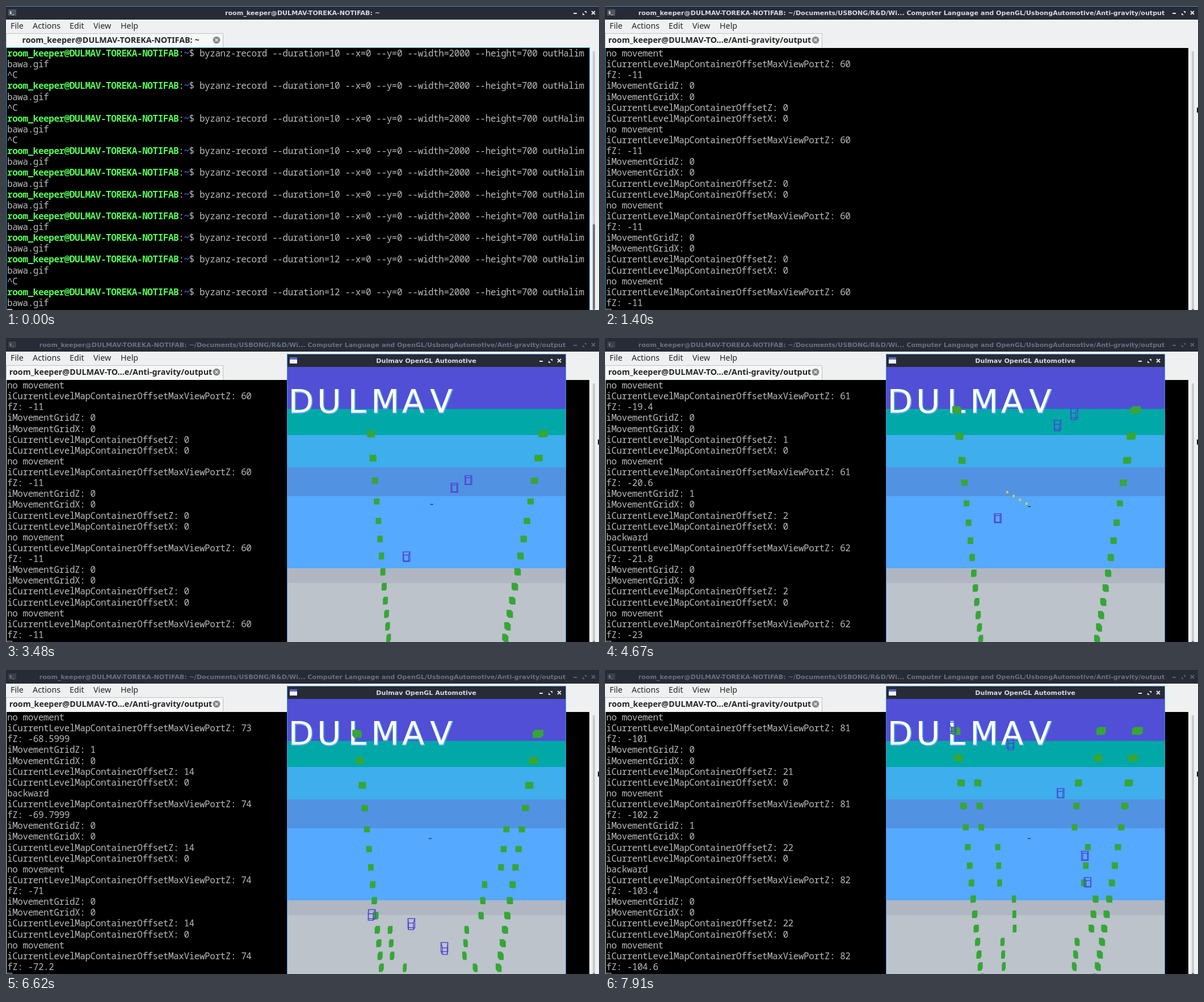
Recreate the animation shown at these times as an HTML page with a canvas. Size 1045 by 536 pixels, loop 7.99 s.

```html
<!DOCTYPE html>
<html>
<head>
<meta charset="utf-8">
<style>
html, body { margin: 0; overflow: hidden; background: #000; }
canvas { display: block; }
</style>
</head>
<body>
<canvas id="stage" width="1045" height="536"></canvas>
<script>
const ctx = document.getElementById('stage').getContext('2d');
const LOOP = 7990, STEP = 85, DRIVE_START = 4070;
const SWITCH_AT = 580, GAME_AT = 1550;

const USER = 'room_keeper@DULMAV-TOREKA-NOTIFAB';
const LONG_TITLE = USER + ': ~/Documents/USBONG/R&D/Wi... Computer Language and OpenGL/UsbongAutomotive/Anti-gravity/output';
const MONO = '16px "Noto Sans Mono", monospace';
const MENU = '14.3px "Noto Sans", sans-serif';
const TITLE = 'bold 11.1px "DejaVu Sans", sans-serif';
const GREEN = '#36a636', WIRE = '#4c48d2', BLUE = '#3daee9', BAR = '#272b36', GRAY = '#bababa';

const clamp = (v, lo, hi) => Math.max(lo, Math.min(hi, v));
const mix = (a, b, k) => a + (b - a) * k;

function rect(x, y, w, h, color) {
  ctx.fillStyle = color;
  ctx.fillRect(x, y, w, h);
}

function text(str, x, y, font, color, align = 'left') {
  ctx.font = font;
  ctx.letterSpacing = font.endsWith(MONO) ? '-0.44px' : '0px';
  ctx.fillStyle = color;
  ctx.textAlign = align;
  ctx.fillText(str, x, y);
}

function line(color, width, ...points) {
  ctx.strokeStyle = color;
  ctx.lineWidth = width;
  ctx.beginPath();
  for (let i = 0; i < points.length; i += 4) {
    ctx.moveTo(points[i], points[i + 1]);
    ctx.lineTo(points[i + 2], points[i + 3]);
  }
  ctx.stroke();
}

function polygon(points, color) {
  ctx.fillStyle = color;
  ctx.beginPath();
  points.forEach(p => ctx.lineTo(p[0], p[1]));
  ctx.closePath();
  ctx.fill();
}

// Minimise, restore and close, with the close button centred on x, y
function windowButtons(x, y, color) {
  line(color, 1.8, x - 35, y + 1, x - 29, y + 1, x - 3, y - 3, x + 3, y + 3, x - 3, y + 3, x + 3, y - 3);
  polygon([[x - 16, y - 3], [x - 12, y - 3], [x - 12, y + 1]], color);
  polygon([[x - 19, y], [x - 19, y + 4], [x - 15, y + 4]], color);
}

// Terminal

const ADVANCE = 9.16;
const rowY = i => 89 + 19.13 * i;

function drawCommands() {
  const runs = [[10, 3, true], [10, 5, false], [12, 1, true], [12, 1, false]];
  const at = column => 2 + column * ADVANCE;
  const end = USER.length;
  let row = 0;
  for (const [duration, count, stopped] of runs) {
    for (let i = 0; i < count; i++) {
      const y = rowY(row++);
      text(USER, at(0), y, 'bold ' + MONO, '#54ff54');
      text(':', at(end), y, MONO, GRAY);
      text('~', at(end + 1), y, 'bold ' + MONO, '#5c5cff');
      text(`$ byzanz-record --duration=${duration} --x=0 --y=0 --width=2000 --height=700 outHalim`,
        at(end + 2), y, MONO, GRAY);
      text('bawa.gif', 2, rowY(row++), MONO, GRAY);
      if (stopped) text('^C', 2, rowY(row++), MONO, GRAY);
    }
  }
}

const gridOffset = n => Math.max(0, Math.floor((n - 1.25) / 3.4));

function cycleLog(n) {
  const tick = Math.max(0, n), offset = gridOffset(tick);
  const moved = offset > gridOffset(tick - 1);
  const depth = 11 + 1.2 * tick;
  const drift = depth > 32 && depth < 70.5 ? 1e-4 : 0;
  const map = 'iCurrentLevelMapContainerOffset';
  return [
    'iMovementGridZ: ' + (moved ? 1 : 0),
    'iMovementGridX: 0',
    map + 'Z: ' + offset,
    map + 'X: 0',
    moved ? 'backward' : 'no movement',
    map + 'MaxViewPortZ: ' + (60 + offset),
    'fZ: -' + Number((depth - drift).toFixed(4))
  ];
}

function drawLog(n) {
  [3, 2, 1, 0].flatMap(back => cycleLog(n - back)).slice(-24)
    .forEach((str, i) => text(str, 2, rowY(i), MONO, GRAY));
}

function drawTerminal(t, tick) {
  const recording = t < SWITCH_AT, inGame = t >= GAME_AT;
  const focused = t < 90;
  const titleColor = inGame ? '#687080' : '#d3dae3';

  rect(0, 0, 1045, 536, '#eff0f1');
  rect(0, 0, 1045, 24, BAR);
  if (!inGame) rect(0, 0, 1045, 1, '#4a90d9');
  rect(4, 6, 14, 11, inGame ? '#3a3f4a' : '#50555c');
  text('$_', 6, 14, 'bold 7px "DejaVu Sans Mono", monospace', inGame ? '#8a8f98' : '#fff');
  text(recording ? USER + ': ~' : LONG_TITLE, 522.5, 15.5, TITLE, titleColor, 'center');
  windowButtons(1035, 12, inGame ? '#596070' : '#e8ebf0');

  [['File', 8], ['Actions', 47], ['Edit', 112], ['View', 154], ['Help', 202]]
    .forEach(([label, x]) => text(label, x, 40, MENU, '#232629'));

  rect(0, 48, 383, 25, '#bfc1c3');
  rect(1, 49, 381, 24, '#f6f7f7');
  text(recording ? USER + ': ~' : 'room_keeper@DULMAV-TO...e/Anti-gravity/output',
    184.5, 65, 'bold ' + MENU, '#232629', 'center');
  ctx.fillStyle = '#86888a';
  ctx.beginPath();
  ctx.arc(371, 60, 6.3, 0, 7);
  ctx.fill();
  line('#f4f4f4', 1.2, 368.5, 57.5, 373.5, 62.5, 368.5, 62.5, 373.5, 57.5);

  if (focused) rect(0, 73, 1029, 463, BLUE);
  else if (!inGame) rect(0, 74, 1, 462, BLUE);
  rect(1, 74, 1027, 462, '#000');
  if (recording) drawCommands(); else drawLog(tick);
  if (focused) rect(2, 534, 9, 2, '#b2b2b2');
  else line('#b2b2b2', 1, 2, 534.5, 11, 534.5, 2.5, 534, 2.5, 536, 10.5, 534, 10.5, 536);

  if (recording || t >= 1400) {
    rect(1034, 80, 4, 456, '#c9cbcd');
    if (recording) rect(1034, 385, 4, 151, '#6f7377');
  }
  rect(1034, 534, 4, 2, '#888b8e');

  if (!recording) {
    polygon([[1042, 176], [1042, 191], [1045, 188], [1045, 178]], '#fff');
    polygon([[1043, 178], [1043, 189], [1045, 187], [1045, 180]], '#111');
  }
}

// Game

const road = { scroll: 0, slide: 0 };
const depthY = u => 1268.8 - 27106 / (u + 23.74);

function columnX(col, y) {
  const shift = road.slide * (27.5 - 0.0252 * (y - 167));
  const left = 620 + 0.104 * (y - 127), right = 935 - 0.168 * (y - 127);
  return mix(left, right, col / 10) + shift;
}

function place(col, row) {
  const y = depthY(row - road.scroll);
  return [columnX(col, y), y];
}

// Half the offset between the near and far face of a block
const lean = (x, y) => [(x - 748) / 190 * (290 - y) / 170 * 2.3, Math.abs(290 - y) / 100];

function drawBush(col, row) {
  const [x, y] = place(col, row), [sx, sy] = lean(x, y);
  const half = 5.6 - (y - 110) * 0.008 + Math.abs(x - 748) * 0.008;
  const g = sx < 0 ? -half : half, h = 5.2;
  polygon([
    [x + sx - g, y - sy - h], [x + sx + g, y - sy - h], [x + sx + g, y - sy + h],
    [x - sx + g, y + sy + h], [x - sx - g, y + sy + h], [x - sx - g, y + sy - h]
  ], GREEN);
}

function drawCrate(col, row) {
  const [x, y] = place(col, row), [sx, skew] = lean(x, y);
  const sy = skew * 1.8, w = 6, h = 8, far = 0.72;
  const corner = (side, a, b) => {
    const scale = side > 0 ? 1 : far;
    return [x + side * sx + a * w * scale, y - side * sy + b * h * scale];
  };
  for (const side of [-1, 1]) {
    const [x0, y0] = corner(side, -1, -1), [x1, y1] = corner(side, 1, 1);
    ctx.strokeStyle = WIRE;
    ctx.lineWidth = 1.4;
    ctx.strokeRect(x0, y0, x1 - x0, y1 - y0);
  }
  for (const a of [-1, 1])
    for (const b of [-1, 1])
      line(WIRE, 1.4, ...corner(1, a, b), ...corner(-1, a, b));
}

// from, to, time of the given place, column, row, columns per second, rows per second
const crates = [
  [1550, 5600, 2170, 4.27, 3.06, 0.56, 0.22],
  [1550, 5600, 2170, 5.07, 2.8, 0.6, 0.15],
  [1550, 3100, 2170, 4.7, 3.73, 0.1, 0.1],
  [1550, 4900, 2170, 1.56, 6.33, 0.17, 0.58],
  [5800, 7990, 6620, -0.35, 23.99, 0.15, -0.84],
  [5800, 7990, 6620, 2.66, 24.63, 0.27, -0.88],
  [5800, 7990, 6620, 5.33, 26.46, 0.5, -0.78],
  [6600, 7990, 7910, 7.88, 28.47, 0.4, -0.8],
  [6600, 7990, 7910, 8.3, 29.99, 0.4, -0.8]
];

// Inner bushes come in groups of three rows; 0 leaves the left one out
const innerRight = '987898', innerLeft = '001232';

function drawBushes() {
  const first = Math.max(1, Math.floor(road.scroll));
  for (let row = first; row < first + 15; row++) {
    drawBush(0, row);
    drawBush(10, row);
    const group = Math.floor((row - 19) / 3);
    if (innerRight[group]) drawBush(+innerRight[group], row);
    if (+innerLeft[group]) drawBush(+innerLeft[group], row);
  }
}

function drawBanner() {
  ctx.font = '57.6px "DejaVu Sans", sans-serif';
  ctx.letterSpacing = '0px';
  ctx.textAlign = 'center';
  ctx.strokeStyle = '#58a4e4';
  ctx.fillStyle = '#fff';
  ctx.lineWidth = 2;
  [...'DULMAV'].forEach((letter, i) => {
    const x = 520 + 49.4 * i;
    ctx.strokeText(letter, x + 0.7, 132.5);
    ctx.fillText(letter, x, 132);
  });
}

function drawGame(time, step, tick) {
  rect(495, 28, 492, 508, '#4a90d9');
  rect(496, 29, 490, 22, BAR);
  rect(500, 34, 13, 11, '#f2f3f5');
  rect(500, 34, 13, 4, '#5a68c8');
  text('Dulmav OpenGL Automotive', 740.5, 44, TITLE, '#d3dae3', 'center');
  windowButtons(975, 40, '#e8ebf0');

  ctx.save();
  ctx.beginPath();
  ctx.rect(496, 51, 490, 485);
  ctx.clip();
  [[51, '#504fd6'], [125, '#00a8a8'], [171, '#3eaeec'], [228, '#5292e2'],
   [279, '#55a9ff'], [406, '#b0b7c2'], [432, '#bcc3cb']]
    .forEach(([y, color]) => rect(496, y, 490, 536 - y, color));

  road.slide = 1 - clamp((time - 3230) / 760, 0, 1);
  road.scroll = 0.3 * tick + 0.14 * road.slide;

  drawBanner();
  drawBushes();
  for (const [from, to, at, col, row, dCol, dRow] of crates) {
    const s = (time - at) / 1000;
    if (time >= from && time < to) drawCrate(col + dCol * s, row + dRow * s);
  }

  if (time >= 4900 && time < 5800) {
    const [x, y] = place(2.27, 7.9);
    ctx.strokeStyle = '#20f0ff';
    ctx.lineWidth = 2.2;
    ctx.setLineDash([3, 3]);
    ctx.beginPath();
    ctx.ellipse(x, y, 10, 16, 0, 0, 7);
    ctx.stroke();
    ctx.setLineDash([]);
  }

  if (step >= 4 && step <= 10)
    for (let d = Math.max(0, step - 7); d <= step - 4; d++)
      rect(741 - 11.3 * d, 290 - 6.7 * d, 3.5, 4, '#e2d52c');

  const carX = mix(747.5, 751.5, road.slide), carY = mix(297, 291.5, road.slide);
  rect(carX - 2.5, carY - 0.5, 5, 1.3, '#1c2a3c');
  if (road.slide === 1) {
    rect(646, 170, 3, 2, '#e8e050');
    rect(648, 172, 3, 2, '#e03020');
  }
  ctx.restore();
}

function frame(now) {
  const t = now % LOOP;
  const step = Math.floor((t - DRIVE_START) / STEP);
  const tick = Math.max(0, Math.floor(1.79 * step - 2.2));
  drawTerminal(t, tick);
  if (t >= GAME_AT) drawGame(Math.max(GAME_AT, DRIVE_START + step * STEP), step, tick);
  requestAnimationFrame(frame);
}
requestAnimationFrame(frame);
</script>
</body>
</html>
```
